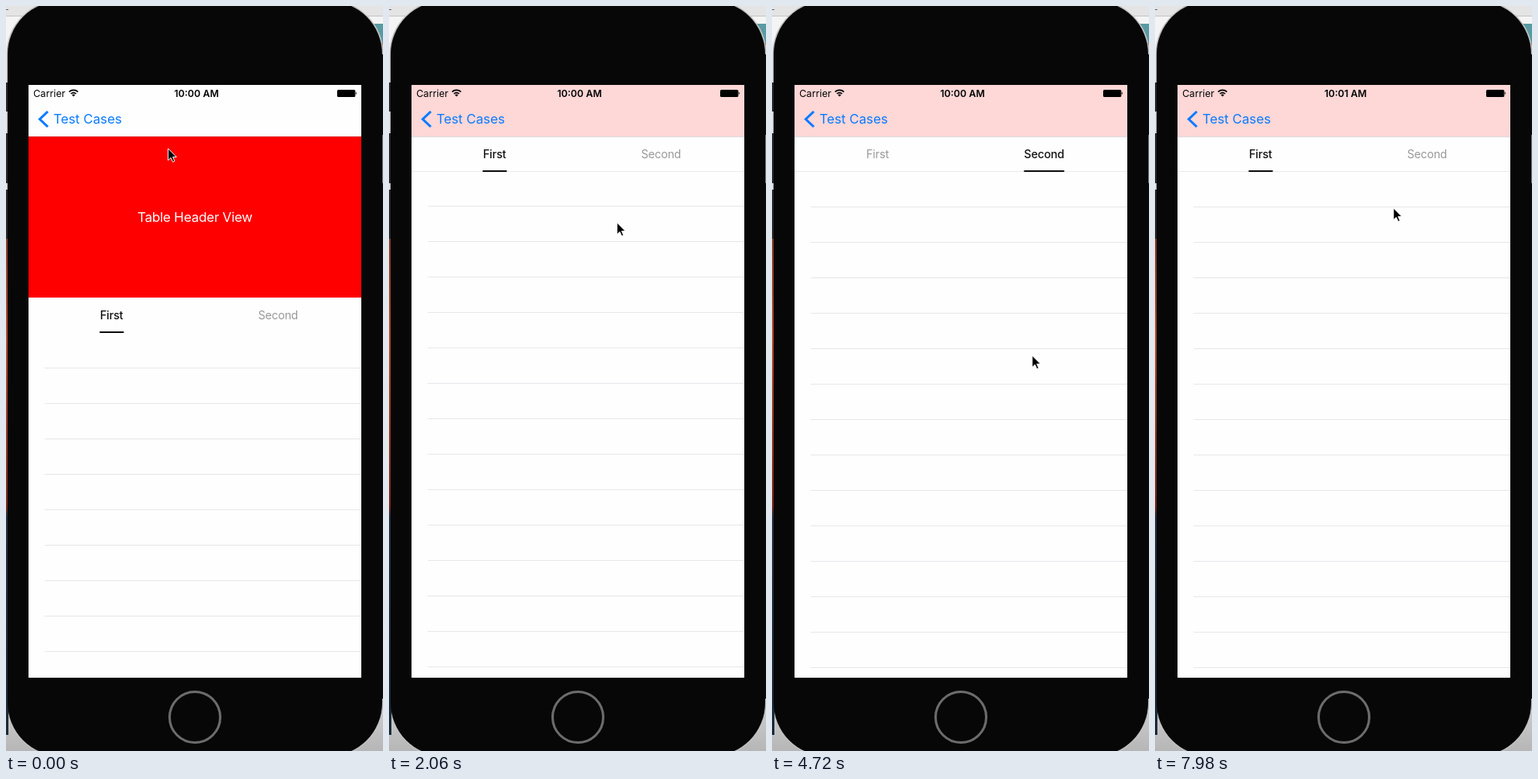
Animation, 469 px wide and 925 px high, one loop 8 s. Source, as an HTML page:

```html
<!DOCTYPE html>
<html lang="en">
<head>
<meta charset="utf-8">
<title>Sticky tabs</title>
<style>
html, body { margin: 0; width: 100%; height: 100%; overflow: hidden; background: #ececec; }
svg { display: block; width: 469px; height: 925px; font-family: Inter, Roboto, sans-serif; }
.mid { text-anchor: middle; }
.tab { font-size: 14px; letter-spacing: -.15px; fill: #989898; }
.tab.on { fill: #111; font-weight: 500; }
.status { font-size: 12px; }
</style>
</head>
<body>
<svg viewBox="0 0 469 925">
  <defs>
    <clipPath id="screen"><rect x="28" y="98" width="414" height="736"/></clipPath>
    <clipPath id="bar"><rect x="28" y="98" width="414" height="64"/></clipPath>
    <filter id="soft" filterUnits="userSpaceOnUse" x="-60" y="-80" width="600" height="900">
      <feGaussianBlur stdDeviation="8"/>
    </filter>
    <linearGradient id="desk" x1="0" y1="0" x2="0" y2="1">
      <stop offset="0" stop-color="#8a3f2c"/>
      <stop offset=".2" stop-color="#b5532f"/>
      <stop offset=".54" stop-color="#7c2b20"/>
      <stop offset=".56" stop-color="#263346"/>
      <stop offset="1" stop-color="#1a2b3a"/>
    </linearGradient>
    <linearGradient id="shade" x1="0" y1="0" x2="0" y2="1">
      <stop offset="0" stop-color="#d6d6d6"/>
      <stop offset="1" stop-color="#b6b6b6"/>
    </linearGradient>
  </defs>

  <!-- desktop behind the phone -->
  <rect width="469" height="925" fill="#f4f4f4"/>
  <rect width="469" height="12" fill="#e4e4e4"/>
  <rect y="12" width="469" height="1" fill="#c4c4c4"/>
  <rect y="4" width="3" height="1" fill="#666"/>
  <rect x="440" y="22" width="29" height="24" fill="#5a9ba3"/>
  <rect x="440" y="46" width="29" height="14" fill="#a4573f"/>
  <rect y="850" width="469" height="75" fill="url(#shade)"/>
  <rect x="2" y="-6" width="466" height="937" rx="66" fill="none" stroke="#c2c2c2" stroke-width="3"/>
  <rect y="289" width="3" height="616" fill="url(#desk)"/>
  <path d="M0 95h3v36H0zM0 158h3v62H0zM0 228h3v61H0z" fill="#2a2a2a"/>
  <rect x="466" y="60" width="3" height="800" fill="#0c0c0c"/>
  <rect x="467" y="160" width="2" height="60" fill="#777"/>

  <!-- phone -->
  <rect x="2" y="-6" width="466" height="937" rx="66" fill="#070707"/>
  <circle cx="235" cy="883" r="31.5" fill="none" stroke="#6c6c6c" stroke-width="3"/>

  <g clip-path="url(#screen)">
    <rect x="28" y="98" width="414" height="736" fill="#fefefe"/>
    <path id="rows" fill="#e8e8ea"/>
    <g id="header">
      <rect x="28" width="414" height="200" fill="#f00"/>
      <text class="mid" x="235" y="106" font-size="16.5" letter-spacing="-.25" fill="#fff">Table Header View</text>
    </g>
    <g id="tabs">
      <rect x="28" width="414" height="44" fill="#fefefe"/>
      <rect id="edge" x="28" y="43" width="414" height="1" fill="#ebebeb"/>
      <text class="tab mid" x="131.3" y="27">First</text>
      <text class="tab mid" x="338.5" y="27">Second</text>
      <rect id="line" y="42" height="2" fill="#111"/>
    </g>
    <g clip-path="url(#bar)">
      <rect x="28" y="98" width="414" height="64" fill="#fefefe"/>
      <rect id="tint" x="-20" width="510" height="500" fill="#f00" filter="url(#soft)"/>
      <rect id="ghost" x="174" width="115" height="13" fill="#fff" opacity=".07"/>
    </g>
    <rect x="28" y="162" width="414" height="1" opacity=".13"/>
    <text class="status" x="34" y="113" letter-spacing=".1">Carrier</text>
    <g fill="none" stroke="#000" stroke-width="1.6">
      <path d="M78.5 106.6a8 8 0 0 1 11 0M80.7 109a5 5 0 0 1 6.6 0"/>
      <path d="M84 112.6l-2-2.2a3 3 0 0 1 4 0z" fill="#000" stroke="none"/>
    </g>
    <text id="clock" class="status mid" x="237" y="113" font-weight="600"></text>
    <rect x="412" y="104" width="22.5" height="9" rx="1.5"/>
    <path d="M435.2 106.5q2 1.8 0 3.6z"/>
    <path d="M52 131L42 140.5L52 150" fill="none" stroke="#0a7bff" stroke-width="3"/>
    <text x="59" y="146" font-size="16.4" letter-spacing="-.05" fill="#0a7bff">Test Cases</text>
  </g>

  <path id="cursor" d="M.7 1v14.6l3.4-3.2 2.4 5.2 2.3-1-2.3-5.1h4.6z" stroke="#fff"/>
</svg>
<script>
const LOOP = 8000, PAGE = 414, ROW = 44;
const $ = id => document.getElementById(id);
const tabText = document.querySelectorAll('.tab');

// Pointer stops: time, x, y
const stops = [
  [400, 201, 176], [800, 190, 592], [920, 190, 592], [1150, 174, 338], [1400, 184, 234],
  [1710, 186, 234], [2060, 283, 268], [2590, 314, 186], [2850, 314, 186], [3620, 218, 555],
  [3980, 221, 267], [4450, 331, 433], [4720, 323, 433], [5060, 76, 398], [5500, 76, 398],
  [5920, 237, 400], [6500, 192, 416], [6660, 192, 416], [7400, 382, 447], [7980, 296, 250]
];

const mix = (a, b, k) => a + (b - a) * k;
const ramp = (t, a, b) => Math.max(0, Math.min(1, (t - a) / (b - a)));
const ease = (t, a, b) => { const k = ramp(t, a, b); return k * k * (3 - 2 * k); };

// Rubber band: pulled out until the peak, then a damped return
function tug(t, from, peak, size) {
  if (t < peak) return size * ease(t, from, peak);
  const w = (t - peak) / 95;
  return size * (1 + w) * Math.exp(-w);
}

function pointer(t) {
  let [, x, y] = stops[0];
  for (let i = 1; i < stops.length; i++) {
    const k = ease(t, stops[i - 1][0], stops[i][0]);
    x = mix(x, stops[i][1], k);
    y = mix(y, stops[i][2], k);
  }
  return [Math.round(x), Math.round(y)];
}

const move = (el, x, y) => el.setAttribute('transform', `translate(${x} ${y})`);
const set = (el, attrs) => { for (const k in attrs) el.setAttribute(k, attrs[k]); };

function draw(t) {
  const scroll = 200 * ramp(t, 980, 1217);
  const pull = tug(t, 1200, 1410, 120) + tug(t, 3710, 3980, 120);
  const slide = t < 2850 ? 0 : PAGE * (ease(t, 6680, 7280) - 1) - tug(t, 4720, 4980, 96);
  const top = Math.floor(362 - scroll);

  let d = '';
  for (let y = Math.round(449.4 - scroll - pull); y < 834; y += ROW)
    for (const x of [48 + slide, 48 + slide + PAGE])
      if (y > top && x < 442 && x > -366) d += `M${Math.round(x)} ${y}h394v1h-394z`;
  $('rows').setAttribute('d', d);

  move($('header'), 0, top - 200);
  move($('tabs'), 0, top);
  $('edge').setAttribute('opacity', scroll > 10 ? 1 : 0);

  const f = ramp(-slide, 0, PAGE);
  set($('line'), { x: mix(116.5, 313.5, f), width: mix(30, 50, f) });
  tabText[0].classList.toggle('on', f < .5);
  tabText[1].classList.toggle('on', f >= .5);

  set($('tint'), { y: 180 - scroll * 1.1, opacity: mix(.263, .15, ramp(scroll, 144, 200)) });
  $('ghost').setAttribute('y', 266 - scroll);
  $('clock').textContent = t < 5740 ? '10:00 AM' : '10:01 AM';
  move($('cursor'), ...pointer(t));
}

let start;
function frame(now) {
  start ??= now;
  draw((now - start) % LOOP);
  requestAnimationFrame(frame);
}
draw(0);
requestAnimationFrame(frame);
</script>
</body>
</html>
```
